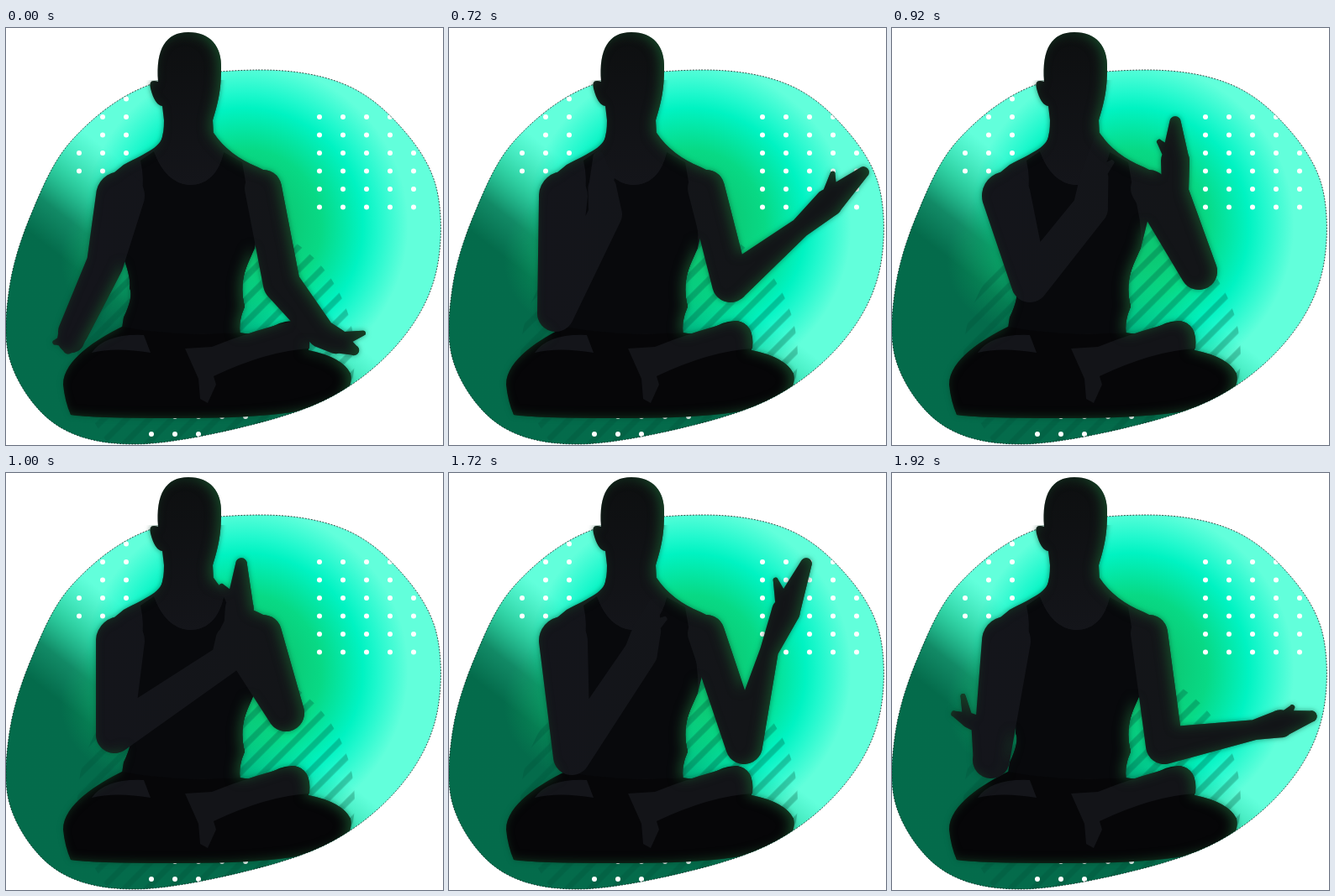
Recreate the animation shown at these times as an HTML page. Size 520 by 497 pixels, loop 2 s.

```html
<!DOCTYPE html>
<html lang="en">
<head>
<meta charset="utf-8">
<title>Meditation</title>
<style>
html, body { margin: 0; width: 100%; height: 100%; overflow: hidden; background: #fff; }
svg { display: block; width: 520px; height: 497px; }
.pose { opacity: 0; animation: 2s step-end infinite; }
@keyframes rest { 0% { opacity: 1 } 30%, 100% { opacity: 0 } }
@keyframes open { 0%, 36% { opacity: 0 } 30%, 96%, 100% { opacity: 1 } }
@keyframes lift { 0%, 40%, 96%, 100% { opacity: 0 } 36%, 90% { opacity: 1 } }
@keyframes upright { 0%, 46%, 90%, 100% { opacity: 0 } 40%, 86% { opacity: 1 } }
@keyframes near { 0%, 50%, 86%, 100% { opacity: 0 } 46%, 80% { opacity: 1 } }
@keyframes joined { 0%, 80%, 100% { opacity: 0 } 50% { opacity: 1 } }
</style>
</head>
<body>
<svg viewBox="0 0 520 497" xmlns="http://www.w3.org/2000/svg">
  <defs>
    <radialGradient id="mint" gradientUnits="userSpaceOnUse" cx="285" cy="235" r="225">
      <stop offset=".2" stop-color="#0cc873"/>
      <stop offset=".4" stop-color="#08d985"/>
      <stop offset=".62" stop-color="#00f3c2"/>
      <stop offset=".7" stop-color="#1ff8cd"/>
      <stop offset=".86" stop-color="#62ffdb"/>
    </radialGradient>
    <linearGradient id="dusk" gradientUnits="userSpaceOnUse" x1="-107" y1="138" x2="-24" y2="32">
      <stop offset="0" stop-color="#006545" stop-opacity=".96"/>
      <stop offset=".3" stop-color="#00704c" stop-opacity=".82"/>
      <stop offset=".62" stop-color="#00a870" stop-opacity=".5"/>
      <stop offset="1" stop-color="#00c890" stop-opacity="0"/>
    </linearGradient>
    <radialGradient id="haze" gradientUnits="userSpaceOnUse" cx="150" cy="275" r="85">
      <stop offset="0" stop-color="#0cb468" stop-opacity=".7"/>
      <stop offset="1" stop-color="#0cb468" stop-opacity="0"/>
    </radialGradient>
    <linearGradient id="skin" gradientUnits="userSpaceOnUse" x1="100" y1="0" x2="350" y2="0">
      <stop offset="0" stop-color="#14151b"/>
      <stop offset="1" stop-color="#131518"/>
    </linearGradient>
    <linearGradient id="face" gradientUnits="userSpaceOnUse" x1="0" y1="5" x2="0" y2="190">
      <stop offset="0" stop-color="#0d0f10"/>
      <stop offset="1" stop-color="#14151a"/>
    </linearGradient>
    <pattern id="stripes" width="19.1" height="19.1" patternUnits="userSpaceOnUse" patternTransform="rotate(45)">
      <rect x="7" width="7" height="19.1" fill="#004f38" fill-opacity=".3"/>
    </pattern>
    <filter id="rim" filterUnits="userSpaceOnUse" x="0" y="0" width="520" height="497" color-interpolation-filters="sRGB">
      <feComponentTransfer in="SourceAlpha"><feFuncA type="table" tableValues="1 0"/></feComponentTransfer>
      <feGaussianBlur stdDeviation="6.5"/>
      <feOffset dx="-5" dy="1" result="edge"/>
      <feFlood flood-color="#164a29" flood-opacity=".9"/>
      <feComposite in2="edge" operator="in"/>
      <feComposite in2="SourceAlpha" operator="in" result="inner"/>
      <feGaussianBlur in="SourceAlpha" stdDeviation="3" result="soft"/>
      <feFlood x="0" y="62" width="520" height="435" flood-color="#04452c" flood-opacity=".6"/>
      <feComposite in2="soft" operator="in" result="halo"/>
      <feMerge>
        <feMergeNode in="halo"/><feMergeNode in="SourceGraphic"/><feMergeNode in="inner"/>
      </feMerge>
    </filter>
    <path id="blob"/>
    <clipPath id="inBlob"><use href="#blob"/></clipPath>
    <clipPath id="inFigure"><use href="#blob"/><path d="M160 0H270V110H160Z"/></clipPath>
  </defs>

  <g clip-path="url(#inBlob)">
    <rect width="520" height="497" fill="url(#mint)"/>
    <rect width="520" height="497" fill="url(#dusk)"/>
    <rect width="520" height="497" fill="url(#haze)"/>
    <circle cx="250" cy="391" r="165" fill="url(#stripes)"/>
    <g id="dots" fill="#fff"></g>
  </g>
  <use href="#blob" fill="none" stroke="#0a1a14" stroke-dasharray="2 1.5" stroke-opacity=".75"/>

  <g clip-path="url(#inFigure)">
    <g id="figure" filter="url(#rim)">
      <!-- torso, vest, head, legs, calf, foot -->
      <path fill="url(#skin)" d="M187 125C186 142 168 148 140 163L118 181 146 252Q141 270 141 277 149 300 147 310 152 320 140 345L138 366H279Q276 350 284 332 277 305 288 280L296 262 318 175 300 166Q265 152 247 125Z"/>
      <path fill="#08090c" d="M176 147L160 158Q170 200 146 252 141 270 141 277 149 300 147 310 152 320 140 345L138 357Q200 368 278 363 276 350 284 332 277 305 288 280L296 262Q298 230 287 195L281 160 259 148Q250 187 218 187 190 185 176 147Z"/>
      <path fill="url(#face)" d="M217 5C243 5 257 22 256 48 256 75 252 90 246 110L247 130Q252 142 259 148 250 187 218 187 190 185 176 147 188 138 188 110L186 93Q177 92 172 72 169 60 181 64C178 25 190 5 217 5Z"/>
      <path fill="#060608" d="M138 356C110 370 68 395 68 425Q70 445 77 461 100 465 200 465C300 465 365 460 400 440Q413 428 410 412 400 392 360 384 364 352 342 349 322 350 312 360 295 367 278 363 200 368 138 356Z"/>
      <path fill="#14151a" d="M102 387Q118 364 164 366L172 387Q130 380 102 387Z"/>
      <path fill="#131418" d="M213 382L245 380Q295 360 342 349 364 352 361 382 310 385 247 415L250 425 240 447 231 442 229 418Z"/>
    </g>
  </g>
</svg>
<script>
const byId = id => document.getElementById(id);

function add(parent, tag, attrs) {
  const el = document.createElementNS('http://www.w3.org/2000/svg', tag);
  for (const k in attrs) el.setAttribute(k, attrs[k]);
  return parent.appendChild(el);
}

// Closed smooth curve through the given points.
function smooth(p) {
  const at = i => p[(i + p.length) % p.length];
  return 'M' + p[0] + p.map((a, i) => {
    const o = at(i - 1), b = at(i + 1), c = at(i + 2);
    const c1 = a.map((v, k) => v + (b[k] - o[k]) / 6);
    const c2 = b.map((v, k) => v - (c[k] - a[k]) / 6);
    return `C${c1} ${c2} ${b}`;
  }).join('') + 'Z';
}

byId('blob').setAttribute('d', smooth([[300, 50], [400, 66], [468, 116], [512, 190], [512, 290],
  [470, 372], [390, 438], [280, 476], [150, 496], [60, 473], [6, 400], [4, 310], [32, 217], [80, 132], [170, 68]]));

function dots(x, y, cols, rows, keep = () => true) {
  for (let r = 0; r < rows; r++)
    for (let c = 0; c < cols; c++)
      if (keep(c, r)) add(byId('dots'), 'circle', { cx: x + 28 * c, cy: y + 21.5 * r, r: 3 });
}
dots(87, 84.5, 3, 5, (c, r) => 2 * c + r > 2);
dots(373, 106, 5, 6);
dots(201, 463, 4, 1);
dots(173, 484, 3, 1);

// Tapered capsule between two joints [x, y, radius].
function taper([ax, ay, ar], [bx, by, br]) {
  const len = Math.hypot(bx - ax, by - ay) || 1;
  const nx = (ay - by) / len, ny = (bx - ax) / len;
  return `M${ax + nx * ar} ${ay + ny * ar}L${bx + nx * br} ${by + ny * br}` +
    `A${br} ${br} 0 0 0 ${bx - nx * br} ${by - ny * br}L${ax - nx * ar} ${ay - ny * ar}` +
    `A${ar} ${ar} 0 0 0 ${ax + nx * ar} ${ay + ny * ar}Z`;
}

const clamp = (v, lo, hi) => Math.min(hi, Math.max(lo, v));

// Shoulder, elbow, wrist and fingertip give the arm; palm and thumb follow from them.
function arm(parent, side, shoulder, [ex, ey], wrist, [tx, ty]) {
  const [wx, wy, wr] = wrist, elbow = [ex, ey, 22];
  const dx = tx - wx, dy = ty - wy, len = Math.hypot(dx, dy);
  const palmR = clamp(.24 * len, .9 * wr, 17);
  const palm = [wx + dx * .45, wy + dy * .45, palmR];
  const angle = Math.atan2(dy, dx) + side * clamp(21 / len, .31, .75);
  const reach = len * clamp(50 / len, .75, 1.2);
  const thumb = [wx + reach * Math.cos(angle), wy + reach * Math.sin(angle), 3];
  const bones = [[shoulder, elbow], [elbow, wrist], [wrist, palm],
    [palm, [tx, ty, palmR * .4]], [[palm[0], palm[1], palmR * .7], thumb]];
  add(parent, 'path', { d: bones.map(b => taper(...b)).join(''), fill: 'url(#skin)' });
}

const LEFT = [136, 200, 29], RIGHT = [306, 191, 22];

// Per pose and arm: elbow, wrist with radius, fingertip.
const poses = {
  rest: [[[118, 280], [80, 362, 18], [74, 382]], [[328, 305], [375, 364, 17], [414, 384]]],
  open: [[[118, 342], [104, 300, 10], [74, 287]], [[324, 325], [432, 306, 12], [499, 290]]],
  lift: [[[127, 340], [186, 222, 20], [178, 154]], [[335, 305], [418, 238, 12], [493, 172]]],
  upright: [[[146, 338], [228, 215, 20], [244, 156]], [[351, 325], [381, 212, 11], [425, 108]]],
  near: [[[164, 305], [236, 215, 21], [246, 135]], [[365, 290], [337, 195, 16], [337, 112]]],
  joined: [[[129, 312], [262, 222, 18], [270, 170]], [[333, 286], [276, 205, 18], [280, 108]]]
};

for (const [name, [left, right]] of Object.entries(poses)) {
  const g = add(byId('figure'), 'g', { class: 'pose', style: 'animation-name:' + name });
  arm(g, -1, RIGHT, ...right);
  arm(g, 1, LEFT, ...left);
}
</script>
</body>
</html>
```
